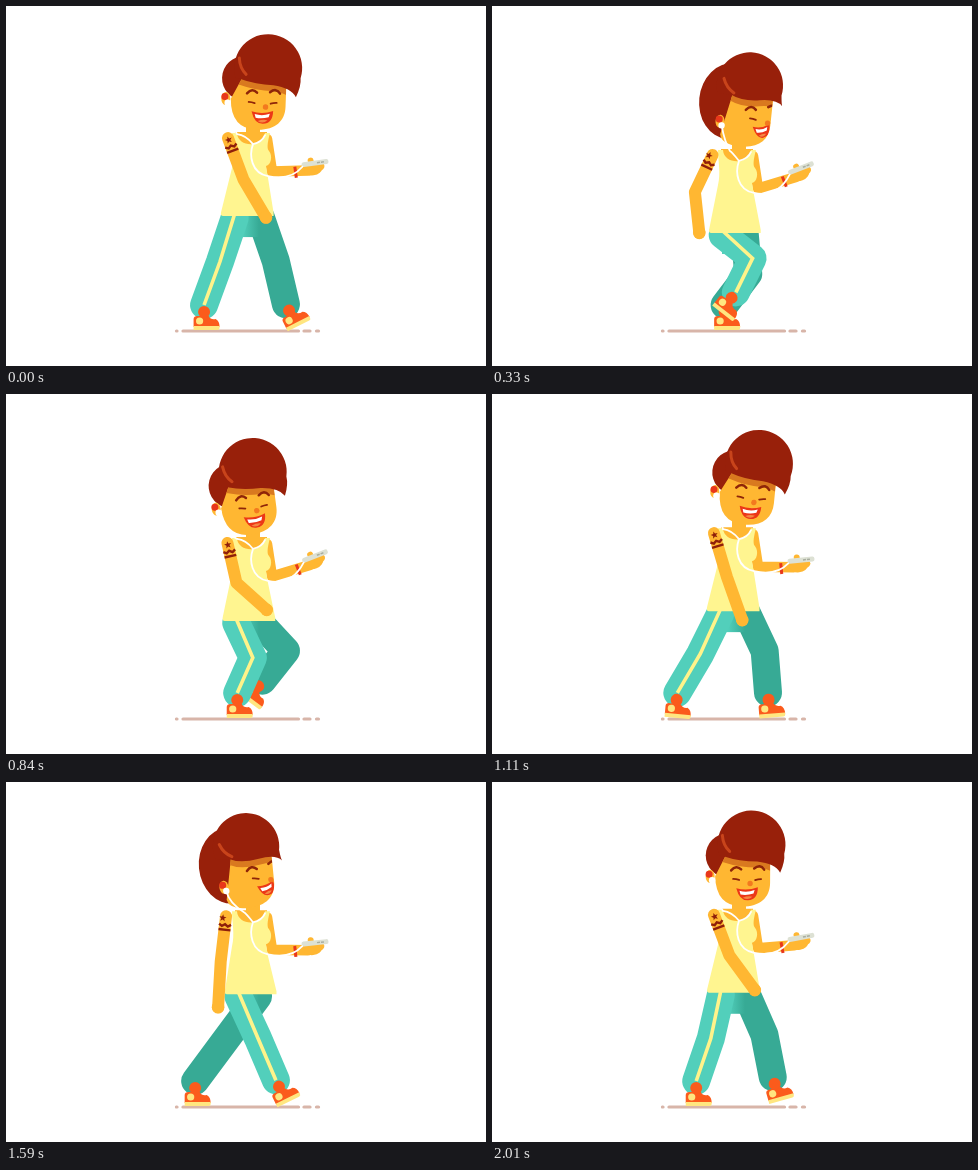
These frames come from a looping animation (480 by 360 pixels, 2040 ms). An HTML page:

```html
<!DOCTYPE html>
<html lang="en">
<head>
<meta charset="utf-8">
<title>Walking to music</title>
<style>
  html, body { margin: 0; width: 100%; height: 100%; overflow: hidden; background: #fff; }
  svg { display: block; width: 100vw; height: 100vh; }
  .line { fill: none; stroke-linecap: round; stroke-linejoin: round; }
  .skin { fill: #ffb732; }
  .limb { stroke: #ffb732; }
  .hair { fill: #98200a; }
  .brown { stroke: #8f2508; }
</style>
</head>
<body>
<svg viewBox="0 0 480 360">
  <defs>
    <linearGradient id="seat" gradientUnits="userSpaceOnUse" x1="236" x2="253" y1="0" y2="0">
      <stop offset="0" stop-color="#52cfbb"/><stop offset="1" stop-color="#37aa95"/>
    </linearGradient>
    <path id="face"/>
    <clipPath id="faceClip"><use href="#face"/></clipPath>
    <g id="shoe">
      <path fill="#fb5b1c" d="M-13 9V1Q-13-2-9-2H2Q4 2 9 1Q13 3 13 9Z"/>
      <circle fill="#fb5b1c" cx="-2.500" cy="-6" r="6"/>
      <path fill="#ffe680" d="M-13 8H13V10Q13 12 11 12H-13Z"/>
      <circle fill="#ffe680" cx="-7" cy="3" r="3.600"/>
    </g>
  </defs>

  <path class="line" stroke="#d8b5a9" stroke-width="3.200" d="M170.500 325h.5M177 325H292.500M298 325h6M310.500 325h2"/>

  <path id="farLeg" class="line" stroke="#37aa95" stroke-width="28"/>
  <use id="farShoe" href="#shoe"/>
  <rect id="pelvis" x="230" width="26" height="21" fill="url(#seat)"/>
  <path id="nearLeg" class="line" stroke="#52cfbb" stroke-width="28"/>
  <path id="stripe" fill="none" stroke="#fff38a" stroke-width="3.600"/>
  <use id="nearShoe" href="#shoe"/>

  <path id="farArm" class="line limb" stroke-width="10.500"/>
  <g id="phone">
    <ellipse class="skin" cx="-3" cy="6" rx="9" ry="6"/>
    <ellipse class="skin" cx="3" cy="4" rx="6" ry="4.500"/>
    <circle class="skin" cx="-4" cy="-3" r="3"/>
    <path stroke="#e8371b" stroke-width="3" d="M-20.500 1V12"/>
    <rect x="-13.500" y="-2.500" width="27" height="5" rx="2" fill="#dde1d4"/>
    <path stroke="#a9ae9f" stroke-width="1.500" stroke-dasharray="3 1" d="M2 0H10"/>
  </g>

  <g id="torso">
    <path class="skin" d="M240-102H254V-84H261V-66H229V-84H240Z"/>
    <path id="shirt" fill="#fff590"/>
  </g>
  <path id="nearArm" class="line limb" stroke-width="12"/>
  <circle id="fist" class="skin" r="6.300"/>
  <g id="tattoo">
    <path id="star" fill="#8f1f0a"/>
    <path fill="none" stroke="#8f1f0a" stroke-width="2.400" d="M-6 8l3 2 3-2 3 2 3-2M-6 13.500H6"/>
  </g>

  <g id="head">
    <ellipse id="backHair" class="hair"/>
    <use href="#face" class="skin"/>
    <g clip-path="url(#faceClip)">
      <path id="shade" fill="#d9791f" transform="translate(0 6)"/>
      <path id="browA" class="line brown" stroke-width="2.500" d="M-5 2Q0-4 5 1"/>
      <path id="browB" class="line brown" stroke-width="2.500" d="M-5 1Q1-4 5 2"/>
      <path id="eyeA" class="line brown" stroke-width="1.800" d="M-3-.5Q0-.5 3 .5"/>
      <path id="eyeB" class="line brown" stroke-width="1.800" d="M-3 .5Q0-.5 3-.5"/>
      <g id="mouth">
        <path fill="#ec3717" d="M-10-5Q0-2 10-6Q10 6 1 6.500Q-7 7-10-5Z"/>
        <path fill="#fff" d="M-7-2.500Q0-.5 7-3.300L6 0Q0 2-6 1Z"/>
        <path fill="#f58742" d="M-4 4Q1 2 5 3Q1 7-4 4Z"/>
      </g>
    </g>
    <circle id="nose" r="2.700" fill="#f3791f"/>
    <path id="topHair" class="hair"/>
    <path id="shine" class="line" stroke="#c8441b" stroke-width="3" stroke-dasharray="18 5 .1 30"/>
    <g id="ear">
      <ellipse class="skin" rx="4.500" ry="6.500"/>
      <circle cx="-1" cy="-2" r="3.500" fill="#e8371b"/>
      <circle cx="2" cy="4" r="3.200" fill="#fff"/>
    </g>
  </g>
  <path id="cable" class="line" stroke="#fff" stroke-width="1.800"/>
</svg>

<script>
const LOOP = 2040, CYCLE = 1020, STEP = 30;
const { PI, sin, cos, max, min, hypot, atan2 } = Math;
const node = Object.fromEntries([...document.querySelectorAll('[id]')].map(e => [e.id, e]));
const set = (id, attr, value) => node[id].setAttribute(attr, value);
const place = (id, [x, y], angle = 0, extra = '') =>
  set(id, 'transform', `translate(${x} ${y}) rotate(${angle}) ${extra}`);
const mix = (a, b, k) => a + (b - a) * k;
const mixPoint = (a, b, k) => [mix(a[0], b[0], k), mix(a[1], b[1], k)];
const line = (...points) => 'M' + points.map(p => p.join(' ')).join('L');
const rad = PI / 180;
const clamp = x => max(0, min(1, x));
const ease = x => (1 - cos(PI * clamp(x))) / 2;
const ramp = (p, from, to) => ease((p - from) / (to - from));

// Swings once per stride (or `times` times), peaking at the given degrees.
const wave = (p, peak, times = 1) => cos(2 * PI * times * p / CYCLE - peak * rad);

// Moves a local point into the frame of a turned part.
function attach([ox, oy], angle, [x, y]) {
  const c = cos(angle * rad), s = sin(angle * rad);
  return [ox + x * c - y * s, oy + x * s + y * c];
}

// Knee or elbow: the closer the two ends, the further the middle sticks out.
function joint([ax, ay], [bx, by], bend) {
  const length = hypot(bx - ax, by - ay);
  const out = max(0, 93 - length) * bend / length;
  return [(ax + bx) / 2 + (by - ay) * out, (ay + by) / 2 - (bx - ax) * out];
}

// The foot swings forward through the air, then slides back on the ground.
const LIFT = 90, LAND = 530;
function step(p, centre, reach) {
  p = (p + CYCLE) % CYCLE;
  const swing = (p - LIFT) / (LAND - LIFT);
  const airborne = swing > 0 && swing < 1;
  const slide = ((p - LAND + CYCLE) % CYCLE) / (CYCLE - LAND + LIFT);
  const x = centre + reach * (airborne ? 2 * ease(swing) - 1 : 1 - 2 * slide ** 1.2);
  const toeUp = 27 * Math.exp(-(((p - 535) / 50) ** 2));
  const heelUp = 38 * ramp(p, 62, 102) * (1 - ramp(p, 330, 500));
  const y = 312 - (airborne ? 14 * sin(PI * swing) : 0) - .12 * toeUp;
  return { at: [x, y], angle: heelUp - toeUp };
}

function drawLeg(name, hip, { at, angle }) {
  const ankle = attach(at, angle, [-2.5, -13]);
  const path = [hip, joint(hip, ankle, .7), ankle];
  set(name + 'Leg', 'd', line(...path));
  place(name + 'Shoe', at, angle);
  return path;
}

// k turns the head from the front (0) to the side (1).
function drawHead(at, tilt, k) {
  place('head', at, tilt);
  const m = (a, b) => mix(a, b, k), mp = (a, b) => mixPoint(a, b, k);

  set('backHair', 'cx', -15.5);
  set('backHair', 'cy', m(-24, -17));
  set('backHair', 'rx', m(22, 31));
  set('backHair', 'ry', m(22, 38));
  set('face', 'd', `M${m(-18, -14)}-32V-23L${m(-28, -22)} ${m(-3, 17)}
    Q${m(-27, -20)} 27 -1 27C17 27 27 18 27 3V-32Z`);
  const left = m(-24, -29), right = m(41, 35), r = m(34, 33.2);
  const fringe = `M${left}-24A${r} ${r} 0 1 1 ${right} ${m(-26, -28)}
    Q${right + 1}-18 ${mp([37, -7], [37, -17])}Q${m(32, 31)} ${m(-16, -24)} 14 ${m(-18, -21)}
    Q-4-18 ${m(-19, -14)}-23Z`;
  set('topHair', 'd', fringe);
  set('shade', 'd', fringe);
  set('shine', 'd', `M${mp([-21, -44], [-24, -39])}Q${mp([-20, -32], [-20, -28])} ${mp([-11, -26], [-9, -24])}`);

  place('browA', mp([-7, -11], [6, -12]));
  place('browB', mp([16, -12], [28, -16]));
  place('eyeA', mp([-7, 0], [9, -1.5]));
  place('eyeB', mp([15, 0], [32, -1]));
  place('nose', mp([7, 4], [24, 1]));
  place('mouth', mp([4, 14], [19, 9.5]), -12 * k, `scale(${m(1.08, .85)} 1.05)`);
  const ear = mp([-33, -3], [-23.5, 4]);
  place('ear', ear);
  return attach(at, tilt, [ear[0] + 2, ear[1] + 4]);
}

function draw(p) {
  const hip = 228 - 18 * cos(PI * (p + 8) / 510) ** 4, top = hip - 83;
  const hipX = 230.5 - 2 * wave(p, 20);
  const turn = ramp(p, 110, 290) - ramp(p, 620, 850);

  drawLeg('far', [253.5 + 1.5 * wave(p, 0), hip + 2], step(p + 530, 236, 52));
  set('pelvis', 'y', hip);
  const [, knee, ankle] = drawLeg('near', [hipX, hip + 2], step(p, 231, 48));
  set('stripe', 'd', line([hipX, hip - 2], knee, ankle));

  const nod = wave(p, 45, 2);
  const phone = [309, hip - 58 + 7 * nod], phoneTilt = -13.5 + 8 * nod;
  set('farArm', 'd', line([261, top + 6], [266, hip - 44.5], attach(phone, phoneTilt, [-8, 6.5])));
  place('phone', phone, phoneTilt);

  set('torso', 'transform', `translate(0 ${hip})`);
  const left = hipX - 13.5, right = left + 52.5 - turn;
  set('shirt', 'd', `M${left + 2} 0Q${left - 1} 0 ${left}-4L226-48C229-60 226-72 226-83H231
    C232-68 257-68 259-83H264C261-72 261-67 263-65C267-60 265-51 260-50L262-38L${right}-3V0Z`);

  const shoulder = [221 + wave(p, 0), hip - 78];
  const hand = [234 + 31 * wave(p, -33), hip + 3 + 9 * wave(p, 70, 2) - 6 * wave(p, -40)];
  const elbow = joint(shoulder, hand, -.8);
  set('nearArm', 'd', line(shoulder, elbow, hand));
  place('fist', hand);
  place('tattoo', shoulder, atan2(shoulder[0] - elbow[0], elbow[1] - shoulder[1]) / rad);
  place('star', [-3 * turn, 2]);

  const bud = drawHead([247.5 + 9 * wave(p, 55), hip - 113.3], 9.5 * wave(p, 72) - .8, turn);
  const plug = attach(phone, phoneTilt, [-13, 2]);
  set('cable', 'd', `M${bud}Q${bud[0] + 3} ${top - 8} ${mix(231, 238, turn)} ${top + 1}
    Q240 ${top + 2} 247 ${top + 11}C243 ${top + 22} 245 ${top + 40} 262 ${top + 43}
    Q${plug[0] - 12} ${top + 48} ${plug}M259 ${top + 2}Q256 ${top + 9} 247 ${top + 11}`);
}

set('star', 'd', line(...Array.from({ length: 10 }, (_, i) =>
  attach([0, 0], i * 36, [0, i % 2 ? -1.6 : -3.8]))) + 'Z');

// The second stride lags a little and catches up by the end.
const phase = t => (t - 28 * sin(PI * clamp((t - 840) / 1200))) % CYCLE;

const start = performance.now();
function tick() {
  const t = max(0, performance.now() - start) % LOOP;
  draw(phase(Math.floor(t / STEP) * STEP));
  requestAnimationFrame(tick);
}
tick();
</script>
</body>
</html>
```
